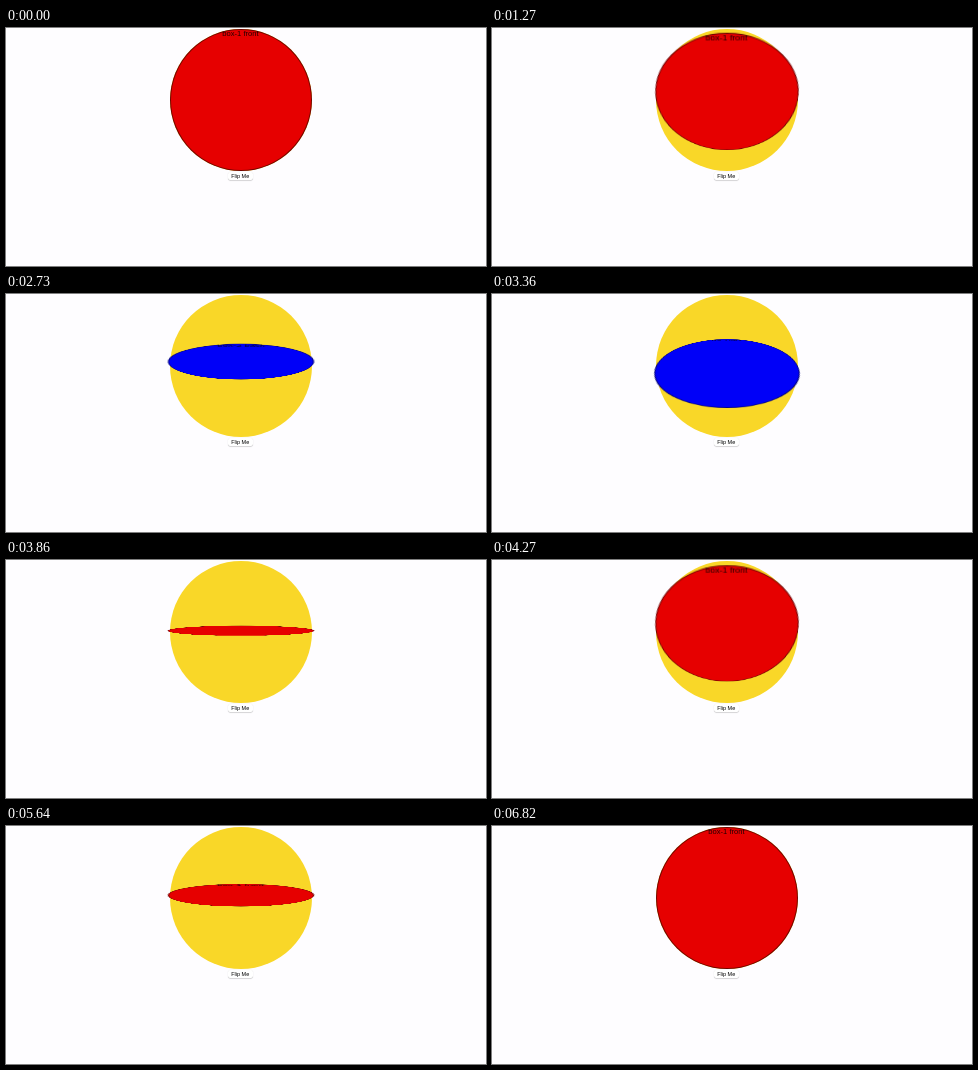
These frames come from a looping animation (480 by 238 pixels, 6870 ms). An HTML page:

```html
<!DOCTYPE html>
<html lang="en">
<head>
<meta charset="utf-8">
<title>Flip Me</title>
<style>
  html, body { margin: 0; width: 100%; height: 100%; overflow: hidden; background: #fefdff; }
  body { position: relative; font-family: "Liberation Sans", Arial, sans-serif; }
  .base, .scene {
    position: absolute; left: 163.5px; top: 1px;
    width: 142px; height: 142px; border-radius: 50%;
  }
  .base { background: #f9d728; }
  .scene { perspective: 287px; }
  .coin { position: absolute; inset: 0; transform-style: preserve-3d; }
  .face {
    position: absolute; inset: 0; box-sizing: border-box; border-radius: 50%;
    border: 1px solid rgba(0, 0, 0, .5);
    font-size: 7.6px; line-height: 7px; text-align: center; white-space: nowrap;
    color: rgba(0, 0, 0, .85); backface-visibility: hidden;
  }
  .front { background: #e60000; }
  .back { background: #0000f8; transform: rotateX(180deg); }
  .button {
    position: absolute; left: 222px; top: 143.5px; width: 24.5px; height: 8px;
    border-radius: 2px; background: #fff;
    box-shadow: 0 .4px .8px rgba(0, 0, 0, .3);
    font-size: 5.5px; line-height: 8px; text-align: center; color: #000;
  }
</style>
</head>
<body>
<div class="base"></div>
<div class="button">Flip Me</div>
<div class="scene">
  <div class="coin" id="coin">
    <div class="face front">box-1 front</div>
    <div class="face back">box-2 back</div>
  </div>
</div>
<script>
  const LOOP = 6870;
  const coin = document.getElementById("coin");

  // Spin curve: time in ms, angle in degrees, speed in degrees per ms.
  const knots = [
    [50, 0, 0], [730, 4.5, .02], [1270, 36, .085], [2270, 162, .19],
    [3360, 477, .5], [4270, 1116, .72], [5640, 1881, .38], [6180, 1980, 0]
  ];

  function hermite([t0, a0, v0], [t1, a1, v1], t) {
    const span = t1 - t0, u = (t - t0) / span, w = 1 - u;
    return a0 * (1 + 2 * u) * w * w + v0 * span * u * w * w
         + a1 * u * u * (3 - 2 * u) - v1 * span * u * u * w;
  }

  function angleAt(t) {
    if (t < 50 || t >= 6820) return 0;
    if (t >= 6500) return 1980 - 3 * ((t - 6460) / 360) ** 2;
    if (t >= 6180) return 1980;
    const next = knots.findIndex(knot => t < knot[0]);
    return hermite(knots[next - 1], knots[next], t);
  }

  function draw() {
    const angle = angleAt(performance.now() % LOOP) % 360;
    coin.style.transform = `rotateX(${-angle}deg)`;
    requestAnimationFrame(draw);
  }
  draw();
</script>
</body>
</html>
```
